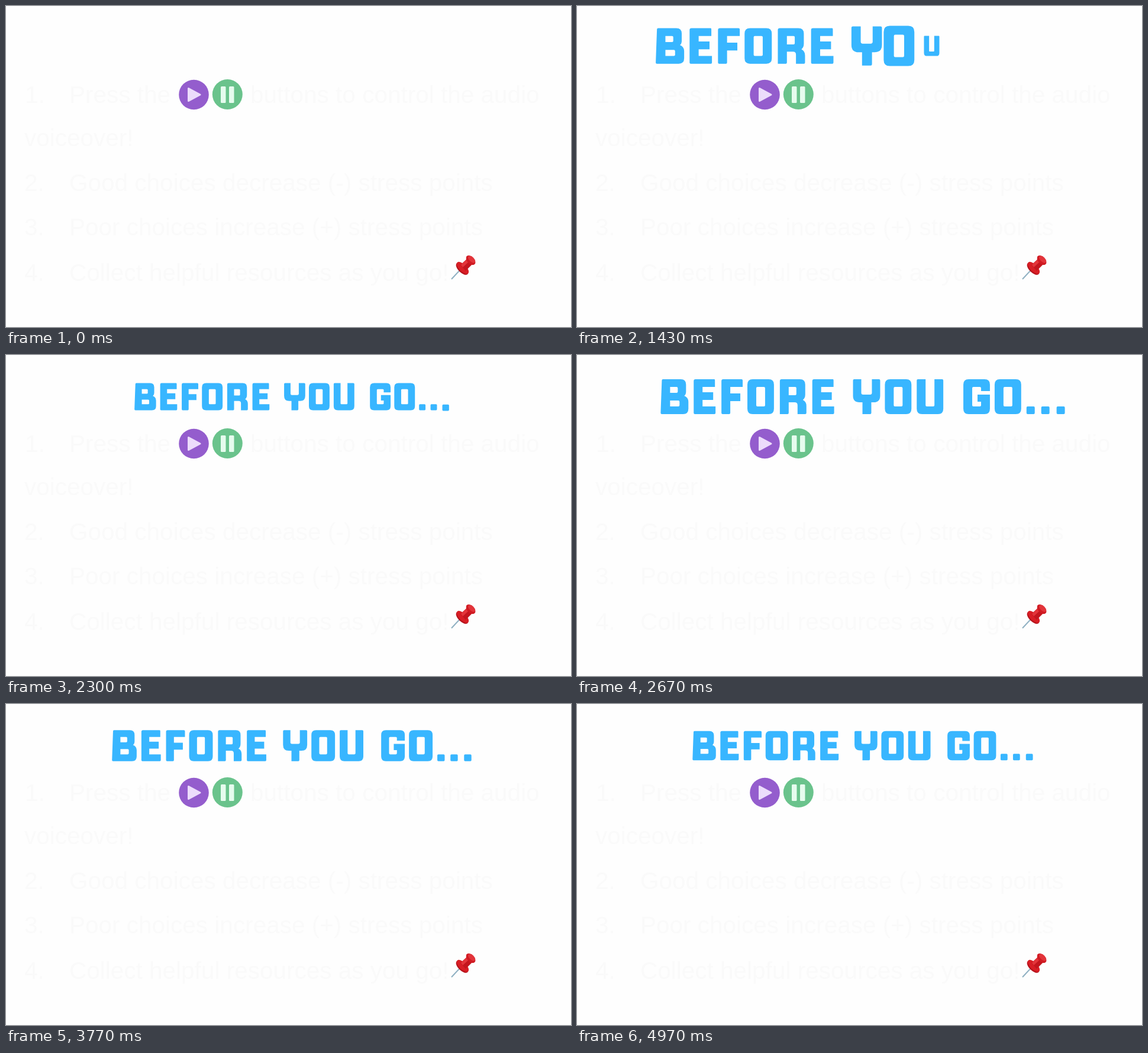
An HTML page for the animation above (5.01 s loop, 955 px wide and 543 px high).

```html
<!DOCTYPE html>
<html lang="en">
<head>
<meta charset="utf-8">
<title>Before you go...</title>
<style>
  html, body { margin: 0; width: 100%; height: 100%; overflow: hidden; background: #fefefe; }
  svg { display: block; width: 955px; height: 543px; }
  .notes { font: 40.5px "Liberation Sans", Arial, sans-serif; fill: #fafafa; }
  #title { fill: #38b6ff; fill-rule: evenodd; }
</style>
</head>
<body>
<svg viewBox="0 0 955 543">
  <g class="notes">
    <text x="32" y="164">1.</text>
    <text x="107" y="164">Press the</text>
    <text x="413" y="164">buttons to control the audio</text>
    <text x="31" y="237">voiceover!</text>
    <text x="31" y="313">2.</text>
    <text x="107" y="313">Good choices decrease (-) stress points</text>
    <text x="31" y="388">3.</text>
    <text x="107" y="388">Poor choices increase (+) stress points</text>
    <text x="31" y="465">4.</text>
    <text x="107" y="465">Collect helpful resources as you go!</text>
  </g>

  <circle cx="317.5" cy="150" r="25.3" fill="#945dcd"/>
  <path d="M308.5 139.5V160.500L328 150Z" fill="#ecdcfb" stroke="#ecdcfb" stroke-width="3" stroke-linejoin="round"/>
  <circle cx="374.3" cy="149.500" r="25.500" fill="#6ac38c"/>
  <g fill="#e6fcee">
    <rect x="363" y="136" width="8.500" height="28" rx="1.500"/>
    <rect x="377" y="136" width="8.500" height="28" rx="1.500"/>
  </g>

  <g id="pin">
    <path d="M753 462L768 446" stroke="#8fb0c2" stroke-width="2"/>
    <ellipse cx="771" cy="444.500" rx="13" ry="6.500" transform="rotate(45 771 444.500)" fill="#b5121b"/>
    <ellipse cx="772" cy="443" rx="13" ry="6" transform="rotate(45 772 443)" fill="#d81e25"/>
    <path d="M768 438L780 427L789 436L777 448Z" fill="#c4161e"/>
    <path d="M769 438L780 427L784 431L772 442Z" fill="#e3353a"/>
    <ellipse cx="785.500" cy="430" rx="9.500" ry="6" transform="rotate(45 785.500 430)" fill="#d01a22"/>
    <ellipse cx="787" cy="428.500" rx="7.500" ry="4" transform="rotate(45 787 428.500)" fill="#e2343a"/>
  </g>

  <g id="title" role="img" aria-label="BEFORE YOU GO..."></g>
</svg>
<script>
const LOOP = 5010, FPS = 30;
const CENTER_X = 482.5, MID = 29.5, UNIT = 1.188;
const FIRST = 485, STAGGER = 100;

// Glyph outlines in a box 59 units high.
const ROUND = 'M9 0H36Q45 0 45 9V50Q45 59 36 59H9Q0 59 0 50V9Q0 0 9 0Z';
const GLYPHS = {
  B: [47, 'M4 0H34Q43 0 43 9V21Q43 26 40 28Q47 31 47 38V50Q47 59 38 59H2Q0 59 0 57L2 2Q2 0 4 0ZM16 13H27Q29 13 29 15V21Q29 23 27 23H16ZM16 36H30Q32 36 32 38V44Q32 46 30 46H16Z'],
  E: [37, 'M3 0H35Q36 0 36 2V13H15V22H33V35H15V46H37V57Q37 59 35 59H2Q0 59 0 57V3Q0 0 3 0Z'],
  F: [36, 'M3 0H34Q36 0 36 2V13H15V24H32V37H15V57Q15 59 13 59H2Q0 59 0 57V3Q0 0 3 0Z'],
  O: [45, ROUND + 'M17 13H28Q30 13 30 15V44Q30 46 28 46H17Q15 46 15 44V15Q15 13 17 13Z'],
  R: [45, 'M3 0H34Q43 0 43 9V26Q43 32 39 35Q45 38 45 45V57Q45 59 43 59H30V44Q30 39 25 39H15V57Q15 59 13 59H0V3Q0 0 3 0ZM15 13H26Q28 13 28 15V25Q28 27 26 27H15Z'],
  Y: [46, 'M2 0H14V23Q14 26 17 26H29Q32 26 32 23V0H44Q46 0 46 2V28Q46 39 35 39H31V57Q31 59 29 59H16V39H11Q0 39 0 28V2Q0 0 2 0Z'],
  U: [45, 'M2 0H15V44Q15 46 17 46H28Q30 46 30 44V0H43Q45 0 45 2V50Q45 59 36 59H9Q0 59 0 50V2Q0 0 2 0Z'],
  G: [45, 'M9 0H36Q45 0 45 9V20H30V15Q30 13 28 13H17Q15 13 15 15V44Q15 46 17 46H28Q30 46 30 44V38H24V26H45V50Q45 59 36 59H9Q0 59 0 50V9Q0 0 9 0Z'],
  '.': [14, 'M2 46H12Q14 46 14 48V57Q14 59 12 59H2Q0 59 0 57V48Q0 46 2 46Z']
};
const TEXT = 'BEFORE YOU GO...';
const LEFTS = [139, 195, 242, 286, 341, 396, 0, 465, 519, 573, 0, 652, 705, 759, 784, 810];

// Steps as [ms, value].
const PULSE = [[500, 1.068], [885, 0.825], [1030, 0.927], [1490, 1.254], [1830, 1.042],
  [2170, 0.828], [2600, 1.138], [2765, 1.254], [3130, 1.031], [3453, 0.828],
  [3770, 1.056], [4035, 1.254], [4230, 1.115], [4710, 0.815], [4970, 1]];
const DROP = [[500, 53], [650, 57], [1030, 64.5], [1490, 68], [1830, 70], [2200, 70.5]];
const POP = [[0, 0], [45, 0.52], [80, 1], [140, 1.13], [245, 1.1], [345, 1.02], [420, 1]];

function at(steps, t) {
  const i = steps.findIndex(s => s[0] > t);
  if (i === 0) return steps[0][1];
  if (i < 0) return steps[steps.length - 1][1];
  const [t0, a] = steps[i - 1], [t1, b] = steps[i];
  return a + (b - a) * (t - t0) / (t1 - t0);
}

const title = document.getElementById('title');
const letters = [];
[...TEXT].forEach((ch, i) => {
  if (ch === ' ') return;
  const [width, d] = GLYPHS[ch];
  const el = document.createElementNS('http://www.w3.org/2000/svg', 'path');
  el.setAttribute('d', d);
  title.append(el);
  letters.push({ el, half: width / 2, x: LEFTS[i] + width / 2 - 481, start: FIRST + i * STAGGER });
});

function draw(t) {
  const scale = at(PULSE, t) / UNIT;
  title.setAttribute('transform', `translate(${CENTER_X} ${at(DROP, t)}) scale(${scale})`);
  for (const { el, half, x, start } of letters) {
    const pop = t < start ? 0 : at(POP, t - start);
    el.style.display = pop > 0 ? '' : 'none';
    el.setAttribute('transform', `translate(${x} 0) scale(${pop}) translate(${-half} ${-MID})`);
  }
}

const began = performance.now();
function tick() {
  const t = (performance.now() - began) % LOOP;
  const step = Math.min(149, Math.floor(t * FPS / 1000 + 0.12));
  draw(step * 1000 / FPS);
  requestAnimationFrame(tick);
}
tick();
</script>
</body>
</html>
```
